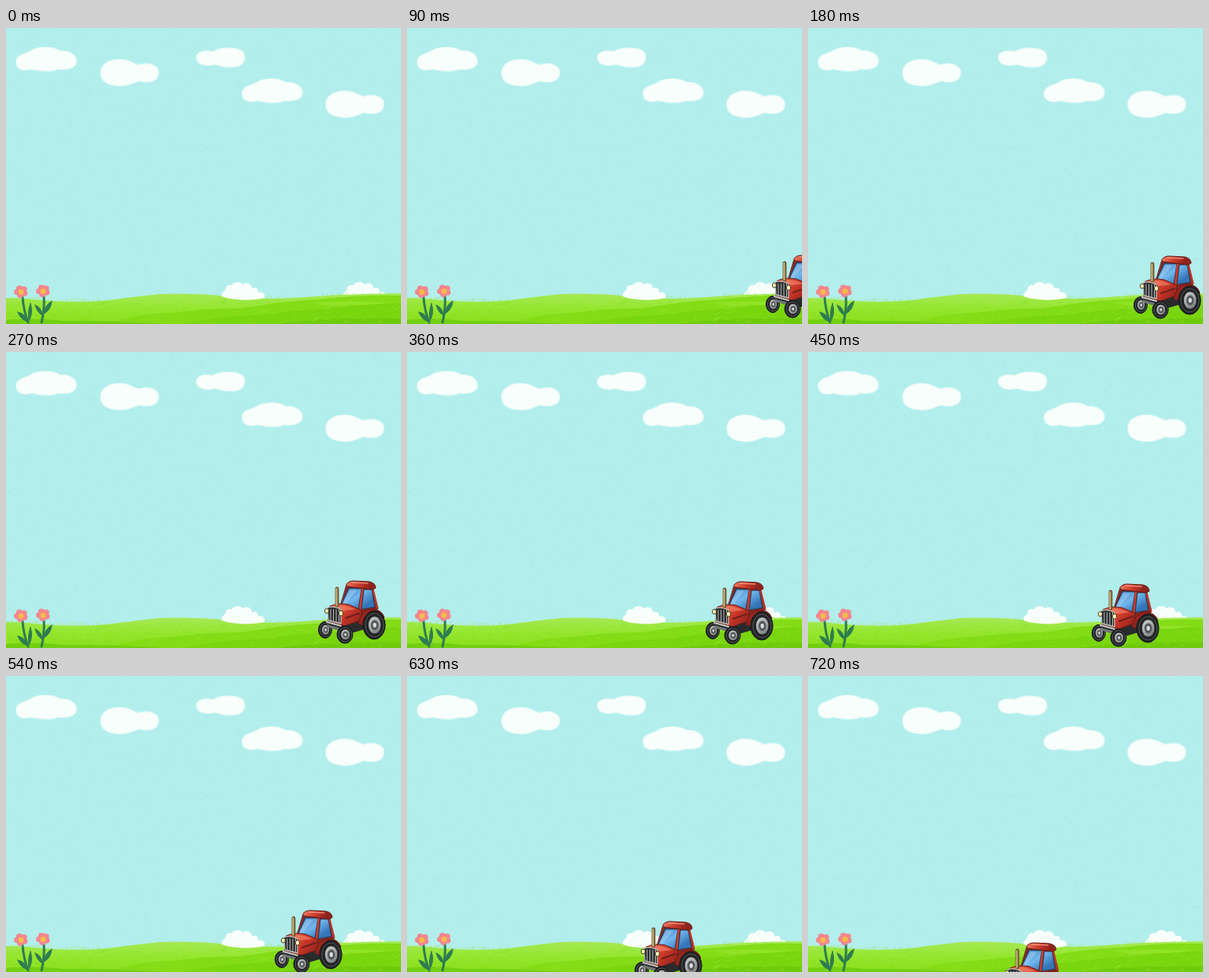
Recreate the animation shown at these times as an HTML page with a canvas. Size 500 px wide and 375 px high, loop 0.81 s.

```html
<!DOCTYPE html>
<html lang="en">
<head>
<meta charset="utf-8">
<title>Tractor in the meadow</title>
<style>
html, body { margin: 0; width: 100%; height: 100%; overflow: hidden; background: #b2eeec; }
canvas { display: block; width: 500px; height: 375px; }
</style>
</head>
<body>
<canvas id="stage" width="500" height="375"></canvas>
<script>
const stage = document.getElementById('stage');
const backdrop = document.createElement('canvas');
backdrop.width = 500;
backdrop.height = 375;
let ctx = backdrop.getContext('2d');

let seed = 7;
const random = () => (seed = (seed * 16807) % 2147483647) / 2147483647;
const between = (a, b) => a + (b - a) * random();

function paint(fill, stroke, width = 1) {
  if (fill) { ctx.fillStyle = fill; ctx.fill(); }
  if (stroke) { ctx.strokeStyle = stroke; ctx.lineWidth = width; ctx.stroke(); }
}
function shape(d, fill, stroke, width = 1) {
  const path = new Path2D(d);
  if (fill) { ctx.fillStyle = fill; ctx.fill(path); }
  if (stroke) { ctx.strokeStyle = stroke; ctx.lineWidth = width; ctx.stroke(path); }
}
function oval(x, y, rx, ry, fill, stroke, width) {
  ctx.beginPath();
  ctx.ellipse(x, y, rx, ry, 0, 0, 7);
  paint(fill, stroke, width);
}
function ramp(x0, y0, x1, y1, ...colors) {
  const g = ctx.createLinearGradient(x0, y0, x1, y1);
  colors.forEach((c, i) => g.addColorStop(i / (colors.length - 1), c));
  return g;
}
function dabs(count, x0, y0, x1, y1, length, colors, alpha) {
  ctx.globalAlpha = alpha;
  for (let i = 0; i < count; i++) {
    const x = between(x0, x1), y = between(y0, y1);
    ctx.beginPath();
    ctx.moveTo(x, y);
    ctx.lineTo(x + between(-length, length), y + between(-length, length) / 2);
    paint(null, colors[i % colors.length], 1.3);
  }
  ctx.globalAlpha = 1;
}
function at(x, y, draw) {
  ctx.save();
  ctx.translate(x, y);
  draw();
  ctx.restore();
}

const WHITE = '#f8fefc';
const HALO = 'rgba(240,253,250,.55)';
const longCloud = 'M1 20C0 11 11 9 18 6C27-1 46-1 56 5C68 4 77 10 77 18C77 27 66 29 54 28C45 32 29 30 20 28C9 31 2 28 1 20Z';
const roundCloud = 'M0 17C0 5 12 0 24 0C37 0 42 6 48 7C60 3 74 7 73 17C73 28 60 30 48 27C38 31 31 34 21 33C8 32 0 27 0 17Z';
const smallCloud = 'M0 13C0 5 10 3 21 5C29 0 40 0 47 1C58 2 61 7 61 12C61 22 52 25 42 24C34 25 29 22 23 21C11 24 1 21 0 13Z';
const bush = 'M0 18C-1 13 4 11 5 9C4 4 10 3 13 4C16-2 25-1 27 3C32-1 39 3 38 8C43 5 47 9 46 13C51 11 56 15 54 20C40 24 12 23 0 18Z';
const meadow = 'M0 342Q22 342 45 345Q90 349 130 345Q165 340 195 337Q235 336 270 339Q320 345 365 342Q415 338 455 337L500 336V375H0Z';

function flower(x, y, stem, leaves) {
  const green = '#2f7c50';
  shape(stem, null, green, 3);
  shape(leaves, green, green, 1);
  for (let i = 0; i < 5; i++) {
    const a = i * Math.PI * 0.4 + 0.5;
    oval(x + 5 * Math.cos(a), y + 4.4 * Math.sin(a), 4, 3.7, '#f2868f');
  }
  oval(x, y + 0.5, 3.3, 3.5, '#f6bd45');
}

function drawBackdrop() {
  ctx.lineCap = ctx.lineJoin = 'round';
  ctx.fillStyle = '#b2eeec';
  ctx.fillRect(0, 0, 500, 375);
  dabs(2600, 0, 0, 500, 345, 5, ['#a5e6e8', '#bdf3ef'], 0.32);

  [[longCloud, 12, 24], [roundCloud, 120, 40], [smallCloud, 241, 25],
   [longCloud, 298, 64], [roundCloud, 405, 80]].forEach(([d, x, y]) =>
    at(x, y, () => shape(d, WHITE, HALO, 2)));

  at(427, 322, () => shape(bush, WHITE));
  // Fuzzy grass rim
  for (let x = 0; x < 500; x += 2) {
    const y = 342 + 3.5 * Math.sin(x / 62 - 0.1) * (x < 230) - 3 * (x > 175 && x < 270) - 4 * (x > 400);
    ctx.beginPath();
    ctx.moveTo(x, y + 5);
    ctx.lineTo(x + between(-2, 3), y - between(-1, 3));
    paint(null, 'rgba(166,231,104,.55)', 1);
  }
  shape(meadow, ramp(0, 337, 0, 375, '#a5e955', '#94e62d', '#88df1b'));
  ctx.save();
  ctx.clip(new Path2D(meadow));
  shape('M130 375Q165 362 210 361Q250 355 300 355Q350 346 395 344Q445 338 500 339V375Z', '#83dc16');
  shape('M225 375Q265 365 320 364Q365 357 420 355Q460 347 500 349V375Z', '#79d50d');
  shape('M0 370Q35 366 70 371Q140 371 205 375H0Z', '#72ce10');
  shape('M340 375Q410 366 500 368V375Z', '#70ca0c');
  shape('M388 348Q430 345 490 348Q440 353 405 352Z', '#91e326');
  dabs(330, 0, 345, 500, 375, 7, ['#a0e944', '#79d317', '#91e229'], 0.3);
  ctx.restore();
  at(273, 322, () => shape(bush, WHITE));

  flower(19, 334, 'M21 341Q22 357 28 373',
    'M15 360Q24 361 27 372Q18 369 15 360ZM31 349Q35 361 29 371Q27 360 31 349Z');
  flower(47, 333, 'M48 340Q49 356 45 373',
    'M37 351Q45 354 46 364Q39 360 37 351ZM58 346Q57 357 48 362Q49 351 58 346Z');
}

function wheel(x, y, rx, ry) {
  oval(x, y, rx, ry, '#222426', '#151719', 1);
  oval(x + 0.5, y, rx * 0.83, ry * 0.83, null, '#55585a', 1);
  oval(x + 0.7, y, rx * 0.6, ry * 0.62, ramp(x - rx, y - ry, x + rx, y + ry, '#f2f2f0', '#a4a6a7', '#54575a'), '#111', 0.8);
  oval(x + 0.7, y, rx * 0.34, ry * 0.36, '#55595b');
  oval(x + 0.7, y, rx * 0.15, ry * 0.16, '#dedfdd');
}

// Local box is about 87 by 79 pixels
function drawTractor() {
  ctx.lineCap = ctx.lineJoin = 'round';
  const red = ramp(20, 25, 60, 58, '#e8694f', '#c83627', '#801d19');
  const edge = '#641d19';
  const glass = ramp(38, 10, 56, 36, '#427fc0', '#72b7ed', '#3475b7');

  wheel(11, 62, 8.5, 10.5);
  shape('M13 51L57 48L65 60L45 66L22 61Z', '#292b2d');
  shape('M14 57L36 63', null, '#72777a', 3);

  shape('M38 6L71 9L78 35L57 48L30 33Z', '#8d2520', edge);
  shape('M41 9L57 10L53 36L31 31Z', glass, '#263f57', 1.2);
  shape('M60 11L70 11L74 33L57 36Z', glass, '#263f57', 1.2);
  shape('M42 11L51 12L37 29L33 29Z', 'rgba(192,229,255,.4)');
  shape('M58 10L55 37', null, '#cc3d2d', 2.5);
  shape('M71 9L77 34', null, '#bd3529', 2.5);
  shape('M38 4Q41 0 47 0L67 1Q75 3 75 9L71 11L39 7Z', ramp(40, 0, 65, 12, '#eb7860', '#cd3c2c', '#8f231e'), edge);
  shape('M45 2L65 3', null, 'rgba(255,183,155,.65)', 1.3);

  shape('M17 32Q28 27 41 30L57 37L56 50L36 57L15 51Z', red, edge);
  shape('M23 32Q34 29 50 36L34 38Z', 'rgba(255,157,125,.48)');
  shape('M37 47L54 41', null, '#6e201d', 2.2);
  shape('M26 10V31', null, '#685432', 4.8);
  shape('M25.4 10V31', null, '#c9b17b', 2.2);

  shape('M14 34Q22 31 31 36L31 54L15 50Z', '#292c2e', '#bfc0bd', 1.3);
  for (let x = 18; x < 31; x += 3.5) shape(`M${x} 36V${50 + (x - 16) / 5}`, null, '#bcbebb', 1);
  oval(13, 38, 2.6, 3.1, '#fff1b5', '#484432', 1);
  oval(31, 41, 2.7, 3.3, '#fff1b5', '#484432', 1);
  shape('M13 52L31 57', null, '#c6c8c5', 2);

  shape('M53 54Q56 39 67 36Q81 34 86 46L83 49Q73 37 63 58Z', red, edge);
  wheel(73, 56, 14, 18);
  wheel(36, 68, 10, 11);
}

// Tractor corner for each step; the first step has no tractor
const STEP = 90;
const places = [null, [452, 288], [410, 289], [393, 290], [376, 291],
                [357, 294], [338, 297], [286, 311], [239, 338]];

drawBackdrop();
ctx = stage.getContext('2d');

function render() {
  const step = Math.floor(performance.now() / STEP) % places.length;
  ctx.drawImage(backdrop, 0, 0);
  if (places[step]) at(...places[step], drawTractor);
  requestAnimationFrame(render);
}
render();
</script>
</body>
</html>
```
